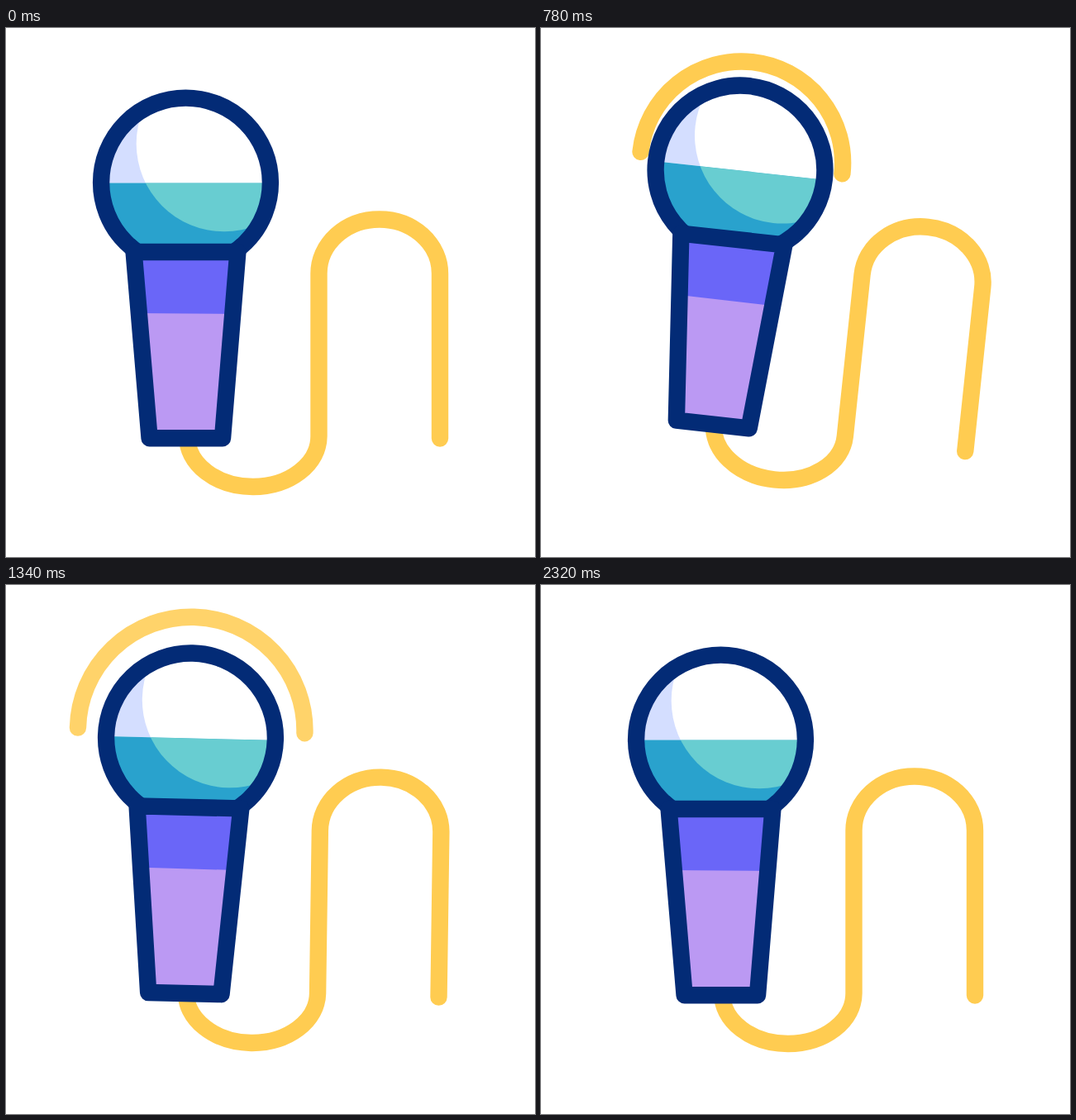
An HTML page that plays this animation: 640 px wide and 640 px high, repeating every 2.4 s.

```html
<!DOCTYPE html>
<html lang="en">
<head>
<meta charset="utf-8">
<title>Microphone</title>
<style>
  html, body { margin: 0; width: 100%; height: 100%; overflow: hidden; background: #fff; }
  svg { display: block; width: 100%; height: 100%; }
  .line { fill: none; stroke-width: 20.4; stroke-linecap: round; stroke-linejoin: round; }
  .gold { stroke: #ffcc51; }
  .navy { stroke: #032b76; }
</style>
</head>
<body>
<svg viewBox="0 0 640 640">
  <defs>
    <clipPath id="ball"><circle cx="217.5" cy="187" r="100"/></clipPath>
    <clipPath id="shine"><circle cx="264" cy="140" r="106.3"/></clipPath>
    <clipPath id="grip"><path d="M154.6 271H280.4L262 496.3H173.6Z"/></clipPath>
  </defs>
  <g id="all">
    <path class="line gold" d="M219 494A79.75 61 0 0 0 378.5 494V297A73.25 65.5 0 0 1 525 297V496.5"/>
    <g id="mic">
      <path id="wave" class="line gold"/>
      <g clip-path="url(#ball)">
        <path fill="#d4deff" d="M110 80H330V187.5H110Z"/>
        <path fill="#29a2cd" d="M110 187.5H330V290H110Z"/>
        <g clip-path="url(#shine)">
          <path fill="#fff" d="M110 80H330V187.5H110Z"/>
          <path fill="#68cdd1" d="M110 187.5H330V290H110Z"/>
        </g>
      </g>
      <circle class="line navy" cx="217.5" cy="187" r="102.4"/>
      <g clip-path="url(#grip)">
        <path fill="#6a66f8" d="M140 265H300V350H140Z"/>
        <path fill="#bb99f3" d="M140 345L300 346V500H140Z"/>
      </g>
      <path class="line navy" d="M154.6 271H280.4L262 496.3H173.6Z"/>
    </g>
  </g>
</svg>
<script>
const LOOP = 2400;
// [time in ms, angle in degrees]
const SWAY = [[0, 0], [600, -3.1], [926, 12.5], [1242, -7.7], [1390, 3.6], [1640, 0], [LOOP, 0]];
const TILT = [[0, 0], [600, -17.7], [904, 9.9], [1222, -4.5], [1385, 1.6], [1640, 0], [LOOP, 0]];
// [start, end] of each sound wave
const WAVES = [[590, 1058], [1058, 1487], [1487, 1996], [1996, 2320]];

const [all, mic, wave] = ['all', 'mic', 'wave'].map(id => document.getElementById(id));
const ease = u => (1 - Math.cos(Math.PI * u)) / 2;

function angleAt(keys, t) {
  const i = keys.findIndex(k => k[0] > t);
  const [t0, a0] = keys[i - 1], [t1, a1] = keys[i];
  return a0 + (a1 - a0) * ease((t - t0) / (t1 - t0));
}

function drawWave(t) {
  const span = WAVES.find(([start, end]) => t >= start && t < end);
  wave.setAttribute('visibility', span ? 'visible' : 'hidden');
  if (!span) return;
  const u = (t - span[0]) / (span[1] - span[0]);
  const r = 99 + 58 * u;
  wave.setAttribute('d', `M${218 - r} 178A${r} ${r} 0 0 1 ${218 + r} 178`);
  wave.setAttribute('opacity', Math.min(1, (1 - u) / 0.4));
}

function draw(t) {
  all.setAttribute('transform', `rotate(${angleAt(SWAY, t)} 372 393)`);
  mic.setAttribute('transform', `rotate(${angleAt(TILT, t)} 217.5 496)`);
  drawWave(t);
}

const begin = performance.now();
function tick() {
  draw((performance.now() - begin) % LOOP);
  requestAnimationFrame(tick);
}
tick();
</script>
</body>
</html>
```
